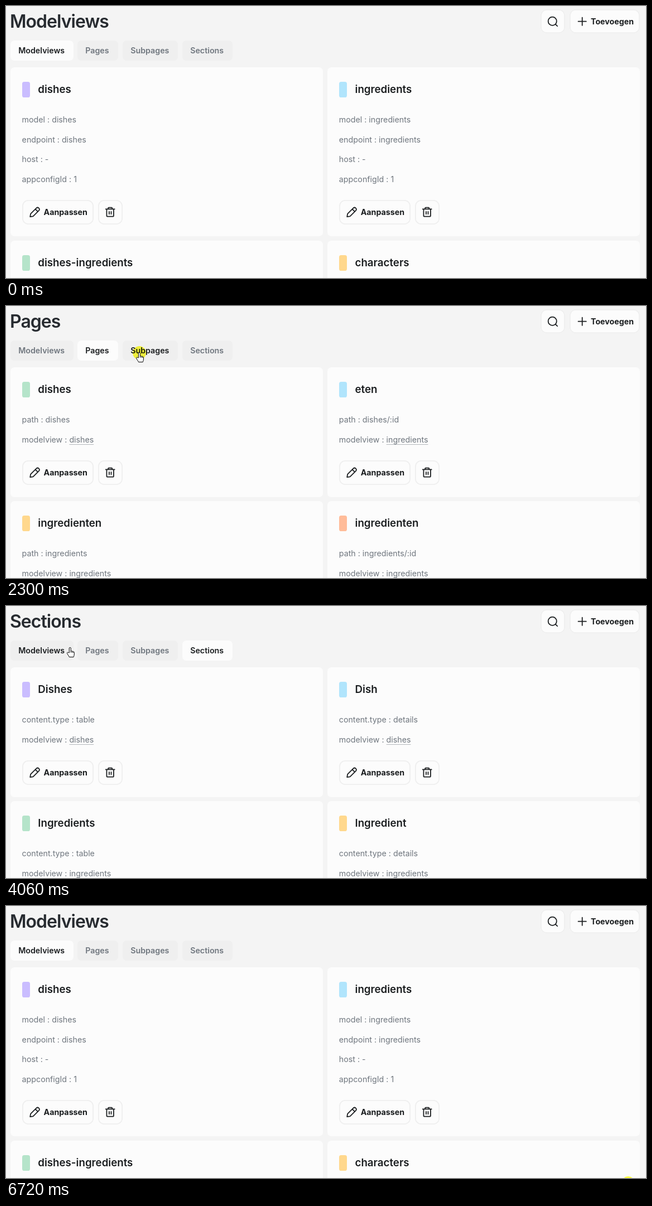
Animation of 1147x488 px, one loop 6.75 s. Source, as an HTML page:

```html
<!DOCTYPE html>
<html lang="nl">
<head>
<meta charset="utf-8">
<title>Modelviews</title>
<style>
html, body { margin: 0; width: 100%; height: 100%; overflow: hidden; }
body { position: relative; background: #f4f4f4; font: 14.24px Inter, sans-serif; font-optical-sizing: none; color: #1a1d1f; }
div, svg { position: absolute; }
.text { line-height: 0; white-space: pre; }
.heading { font-size: 32px; font-weight: 600; letter-spacing: -.03em; color: #272b30; }
.name { font-size: 18.7px; font-weight: 600; }
.label { font-weight: 700; }
.tab { font-weight: 600; color: #6f767e; }
.tab.lit { color: #1a1d1f; }
.row { color: #6f767e; }
.row u { text-decoration: underline 1px #b4b8bc; text-underline-offset: 2.5px; text-decoration-skip-ink: none; }
.box { border-radius: 7px; background: #fcfcfc; }
.tabBox:not(.active) { background: #efefef; }
.chip { border-radius: 3.6px; }
.button { border-radius: 10.7px; box-shadow: inset 0 0 0 1.8px #efefef; }
.button.lit { box-shadow: inset 0 0 0 1.8px #1a1d1f; }
.icon { width: 21.4px; height: 21.4px; fill: none; stroke: #1a1d1f; stroke-width: 2; stroke-linecap: round; stroke-linejoin: round; }
#click { width: 24px; height: 24px; margin: -12px; border-radius: 50%; background: #ffff40; mix-blend-mode: multiply; }
#mouse { left: 0; top: 0; overflow: visible; fill: #fff; stroke: #000; stroke-linejoin: round; }
</style>
</head>
<body>
<script>
const LOOP = 6750, HOVER_LAG = 30;
const PURPLE = '#cabdff', BLUE = '#b1e5fc', GREEN = '#b5e4ca', YELLOW = '#ffd88d', ORANGE = '#ffbc99';

const icons = {
  search: 'M20 11.5a8.5 8.5 0 1 1-17 0a8.5 8.5 0 0 1 17 0zM21.5 21.5l-4-4',
  plus: 'M12 4v16M4 12h16',
  pencil: 'M15 4 4 15a2 2 0 0 0-.5.9L2.5 21.5l5.6-1a2 2 0 0 0 .9-.5L20 9a3.5 3.5 0 0 0-5-5zM13 6l5 5',
  trash: 'M3 6h18M8 6V4a1 1 0 0 1 1-1h6a1 1 0 0 1 1 1v2M5 6v13a2 2 0 0 0 2 2h10a2 2 0 0 0 2-2V6M10 11v5M14 11v5'
};

// Each card: colour, name, rows. Underscores mark a link.
const pages = [
  { title: 'Modelviews', cards: [
    [PURPLE, 'dishes', 'model : dishes', 'endpoint : dishes', 'host : -', 'appconfigId : 1'],
    [BLUE, 'ingredients', 'model : ingredients', 'endpoint : ingredients', 'host : -', 'appconfigId : 1'],
    [GREEN, 'dishes-ingredients'],
    [YELLOW, 'characters']] },
  { title: 'Pages', cards: [
    [GREEN, 'dishes', 'path : dishes', 'modelview : _dishes_'],
    [BLUE, 'eten', 'path : dishes/:id', 'modelview : _ingredients_'],
    [YELLOW, 'ingredienten', 'path : ingredients', 'modelview : _ingredients_'],
    [ORANGE, 'ingredienten', 'path : ingredients/:id', 'modelview : _ingredients_']] },
  { title: 'Subpages', cards: [
    [PURPLE, 'overview', 'title : overview', 'pageId : 3'],
    [BLUE, 'details', 'title : details', 'pageId : 7'],
    [GREEN, 'overview', 'title : overview', 'pageId : 9'],
    [YELLOW, 'details', 'title : details', 'pageId : 10']] },
  { title: 'Sections', cards: [
    [PURPLE, 'Dishes', 'content.type : table', 'modelview : _dishes_'],
    [BLUE, 'Dish', 'content.type : details', 'modelview : _dishes_'],
    [GREEN, 'Ingredients', 'content.type : table', 'modelview : _ingredients_'],
    [YELLOW, 'Ingredient', 'content.type : details', 'modelview : _ingredients_']] }
];
const tabs = [[8, 113], [128, 73], [209, 99], [316, 90]];
const trashArea = [733, 347, 44, 44];

const box = (x, y, w, h, kind = '', style = '') =>
  `<div class="box ${kind}" style="left:${x}px;top:${y}px;width:${w}px;height:${h}px;${style}"></div>`;
const text = (x, y, kind, str) =>
  `<div class="text ${kind}" style="left:${x}px;top:${y}px">${str}</div>`;
const icon = (x, y, name) =>
  `<svg class="icon" viewBox="0 0 24 24" style="left:${x - 10.7}px;top:${y - 10.7}px"><path d="${icons[name]}"/></svg>`;

function card([colour, name, ...rows], i, tall) {
  const x = i % 2 * 568.2, y = i > 1 ? (tall ? 310.8 : 240) : 0, base = y + (tall ? 347.5 : 277);
  return box(x + 8, y + 110, 560, tall ? 303 : 233)
    + box(x + 29, y + 136, 14, 28, 'chip', `background:${colour}`)
    + text(x + 57.3, y + 150, 'name', name)
    + rows.map((row, k) => text(x + 28.6, y + 204 + k * 35.6, 'row', row.replace(/_(.+)_/, '<u>$1</u>'))).join('')
    + box(x + 29, base, 128, 44, 'button') + icon(x + 51.5, base + 22, 'pencil')
    + text(x + 67.5, base + 22, 'label', 'Aanpassen')
    + box(x + 165, base, 44, 44, 'button trash') + icon(x + 186.5, base + 22, 'trash');
}

document.body.innerHTML =
  box(958, 6, 44, 43, 'button') + icon(980, 28, 'search')
  + box(1010, 6, 126, 43, 'button') + icon(1032.7, 28, 'plus') + text(1048, 27.5, 'label', 'Toevoegen')
  + tabs.map(([x, w], i) => box(x, 62, w, 36, 'tabBox') + text(x + 14.2, 80, 'tab', pages[i].title)).join('')
  + pages.map(({ title, cards }, p) => `<div class="page" style="left:0;top:0">${
      text(7, 28, 'heading', title)}${cards.map((c, i) => card(c, i, p === 0)).join('')}</div>`).join('')
  + `<div id="click"></div><svg id="mouse" width="1" height="1">
    <path d="M0 0V15.5l3.6-3.4 2.5 5.9 2.3-1-2.5-5.7H11z"/>
    <path d="M-1.6 9V.9a1.5 1.5 0 0 1 3 0V6.2c.4-.9 2.2-.8 2.4.5.4-.8 1.9-.6 2.1.7.5-.6 1.5-.3 1.5 1V12c0 2-.9 3-1.2 4.6H-1.5C-2 14.4-5.2 11.4-5.4 9.3c0-1.3 1.4-1.6 2.2-.7zM1.4 6.2V8.6M3.8 6.7V8.8M5.9 7.4V9"/></svg>`;

const all = selector => [...document.querySelectorAll(selector)];
const pageEls = all('.page'), tabBoxes = all('.tabBox'), tabTexts = all('.tab');
const trash = all('.trash')[1], mouse = document.getElementById('mouse'), click = document.getElementById('click');
const [arrow, hand] = mouse.children;

// Pointer path: time, x, y.
const path = [
  [0, 1115, 497], [730, 194, 76], [840, 183, 75], [1440, 183, 75], [1900, 239, 84],
  [2450, 239, 84], [2820, 329, 90], [3110, 352, 82], [3530, 352, 82], [4020, 118, 75],
  [4060, 115, 75], [4230, 90, 78], [4960, 90, 78], [5080, 204, 80], [5620, 797, 376],
  [6040, 1080, 489], [6300, 1115, 497], [LOOP, 1115, 497]
];
const clicks = [[1190, 1300], [2300, 2450], [3380, 3530], [4500, 4650], [6720, LOOP]];
const switches = [[4650, 0], [3530, 3], [2450, 2], [1440, 1], [0, 0]];

function slope(i, axis) {
  const a = path[i - 1], b = path[i], c = path[i + 1];
  if (!a || !c || a[1] === b[1] || b[1] === c[1]) return 0;
  return (c[axis] - a[axis]) / (c[0] - a[0]);
}

// Cubic Hermite between points, at rest wherever the pointer pauses.
function pointerAt(t) {
  const i = path.findIndex(p => p[0] > t) - 1, a = path[i], b = path[i + 1];
  const d = b[0] - a[0], u = (t - a[0]) / d, v = 1 - u;
  return [1, 2].map(k => v * v * (1 + 2 * u) * a[k] + u * u * (1 + 2 * v) * b[k]
    + d * u * v * (v * slope(i, k) - u * slope(i + 1, k)));
}

const within = ([px, py], [x, y, w, h]) => px >= x && px < x + w && py >= y && py < y + h;
const show = (el, visible) => el.style.display = visible ? '' : 'none';

function draw() {
  const t = performance.now() % LOOP, [x, y] = pointerAt(t);
  const page = switches.find(([start]) => t >= start)[1];
  const hoverPoint = pointerAt(Math.max(0, t - HOVER_LAG));
  const hoverTab = tabs.findIndex(([left, w]) => within(hoverPoint, [left, 62, w, 36]));
  const hoverTrash = page === 0 && within(hoverPoint, trashArea);
  const pointing = hoverTab >= 0 || hoverTrash;

  pageEls.forEach((el, i) => show(el, i === page));
  tabBoxes.forEach((el, i) => el.classList.toggle('active', i === page));
  tabTexts.forEach((el, i) => el.classList.toggle('lit', i === page || i === hoverTab));
  trash.classList.toggle('lit', hoverTrash);

  mouse.style.transform = click.style.transform = `translate(${x}px,${y}px)`;
  show(mouse, t >= 60);
  show(arrow, !pointing);
  show(hand, pointing);
  show(click, clicks.some(([from, to]) => t >= from && t < to));
  requestAnimationFrame(draw);
}
draw();
</script>
</body>
</html>
```
